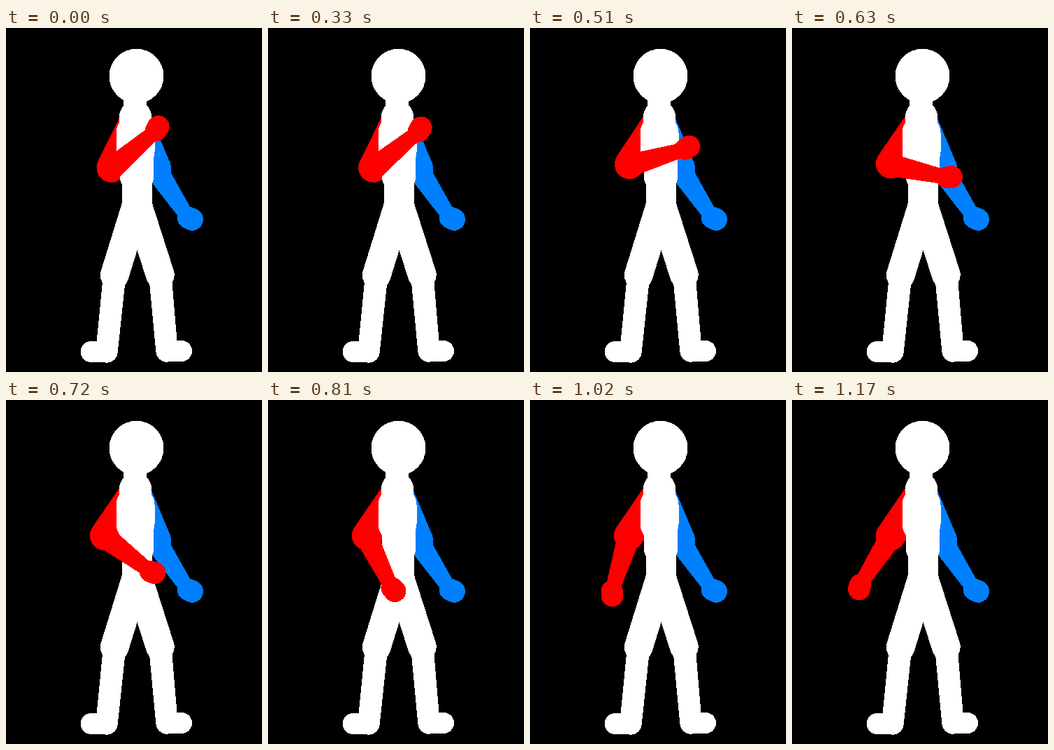
Animation of 366x492 px, one loop 1.62 s. Source, as an HTML page:

```html
<!DOCTYPE html>
<html lang="en">
<head>
<meta charset="utf-8">
<title>Stick figure lowering an arm</title>
<style>
  html, body { margin: 0; width: 100%; height: 100%; overflow: hidden; background: #000; }
  svg { display: block; shape-rendering: crispEdges; }
  .near { fill: #f00; }
  .far { fill: #0080ff; }
  .body { fill: #fff; }
</style>
</head>
<body>
<svg width="366" height="492" viewBox="0 0 366 492">
  <path id="farArm" class="far"/>
  <path id="upperArm" class="near"/>
  <circle class="body" cx="186.5" cy="68.8" r="39"/>
  <path id="body" class="body"/>
  <path id="forearm" class="near"/>
</svg>
<script>
const LOOP = 1620, STEP = 30, START = 300, STEPS = 29;
const SHOULDER = [185, 130], FAR_ELBOW = [215, 201];

// Forearm angle in degrees, keyed by step
const SWING = [[0, -41.1], [1, -39.8], [7, -16.5], [14, 36.8],
               [17, 63], [18, 70.2], [21, 90.6], [29, 120.5]];

const clamp = (v, lo, hi) => Math.min(hi, Math.max(lo, v));
const polar = ([x, y], deg, len) => {
  const a = deg * Math.PI / 180;
  return [x + len * Math.cos(a), y + len * Math.sin(a)];
};
const setPath = (id, d) => document.getElementById(id).setAttribute('d', d);

// Outline of a capsule whose ends may differ in radius
function limb(p, r1, q, r2 = r1) {
  const dx = q[0] - p[0], dy = q[1] - p[1];
  const axis = Math.atan2(dy, dx) * 180 / Math.PI;
  const side = Math.acos((r1 - r2) / Math.hypot(dx, dy)) * 180 / Math.PI;
  const [a, b] = [axis + side, axis - side];
  const big = r1 >= r2 ? 1 : 0;
  return `M${polar(p, a, r1)}A${r1},${r1} 0 ${big} 1 ${polar(p, b, r1)}` +
         `L${polar(q, b, r2)}A${r2},${r2} 0 ${1 - big} 1 ${polar(q, a, r2)}Z`;
}

const upperArm = elbow => limb(SHOULDER, 21.3, elbow);

function forearm(elbow, angle, bend) {
  const fist = polar(elbow, angle, 88.8);
  const wrist = polar(fist, angle - bend, -6.5);
  return limb([elbow[0], elbow[1] + 2], 16.3, wrist, 10) +
         limb(wrist, 15.5, fist, 16);
}

const leg = (knee, heel, toe) =>
  limb([187.3, 250], 20.4, knee) + limb(knee, 16.2, heel, 15.7) + limb(heel, 15, toe);

const torso = () =>
  limb([184.5, 95], 16.5, [184.5, 118]) +
  limb([185, 127], 23, [185, 150]) +
  limb([185, 150], 27.5, [185, 177]) +
  limb([187, 185], 24, [187, 213]) +
  limb([187, 213], 21.5, [187, 250]);

// Smooth curve through the keys, at rest on both ends
function curve(keys, x) {
  const last = keys.length - 1;
  if (x >= keys[last][0]) return keys[last][1];
  const slope = i => i <= 0 || i >= last ? 0 :
    (keys[i + 1][1] - keys[i - 1][1]) / (keys[i + 1][0] - keys[i - 1][0]);
  const i = keys.findIndex(k => k[0] > x) - 1;
  const [x0, y0] = keys[i], [x1, y1] = keys[i + 1];
  const w = x1 - x0, t = (x - x0) / w, u = 1 - t;
  return y0 * u * u * (1 + 2 * t) + y1 * t * t * (3 - 2 * t)
       + w * t * u * (slope(i) * u - slope(i + 1) * t);
}

function draw(now) {
  const step = clamp(Math.floor((now % LOOP - START) / STEP), 0, STEPS);
  const lift = (1 - Math.cos(Math.PI * Math.min(step / 9, 1))) / 2;
  const elbow = polar(SHOULDER, 116.2 + 8.2 * lift, 77.6);
  setPath('upperArm', upperArm(elbow));
  setPath('forearm', forearm(elbow, curve(SWING, step), 18));
}

setPath('farArm', upperArm(FAR_ELBOW) + forearm(FAR_ELBOW, 55, 30));
setPath('body', torso() +
  leg([155.2, 353.5], [144, 463], [121.5, 463]) +
  leg([220.3, 353], [230, 462], [251, 462]));

function tick() {
  draw(performance.now());
  requestAnimationFrame(tick);
}
tick();
</script>
</body>
</html>
```
